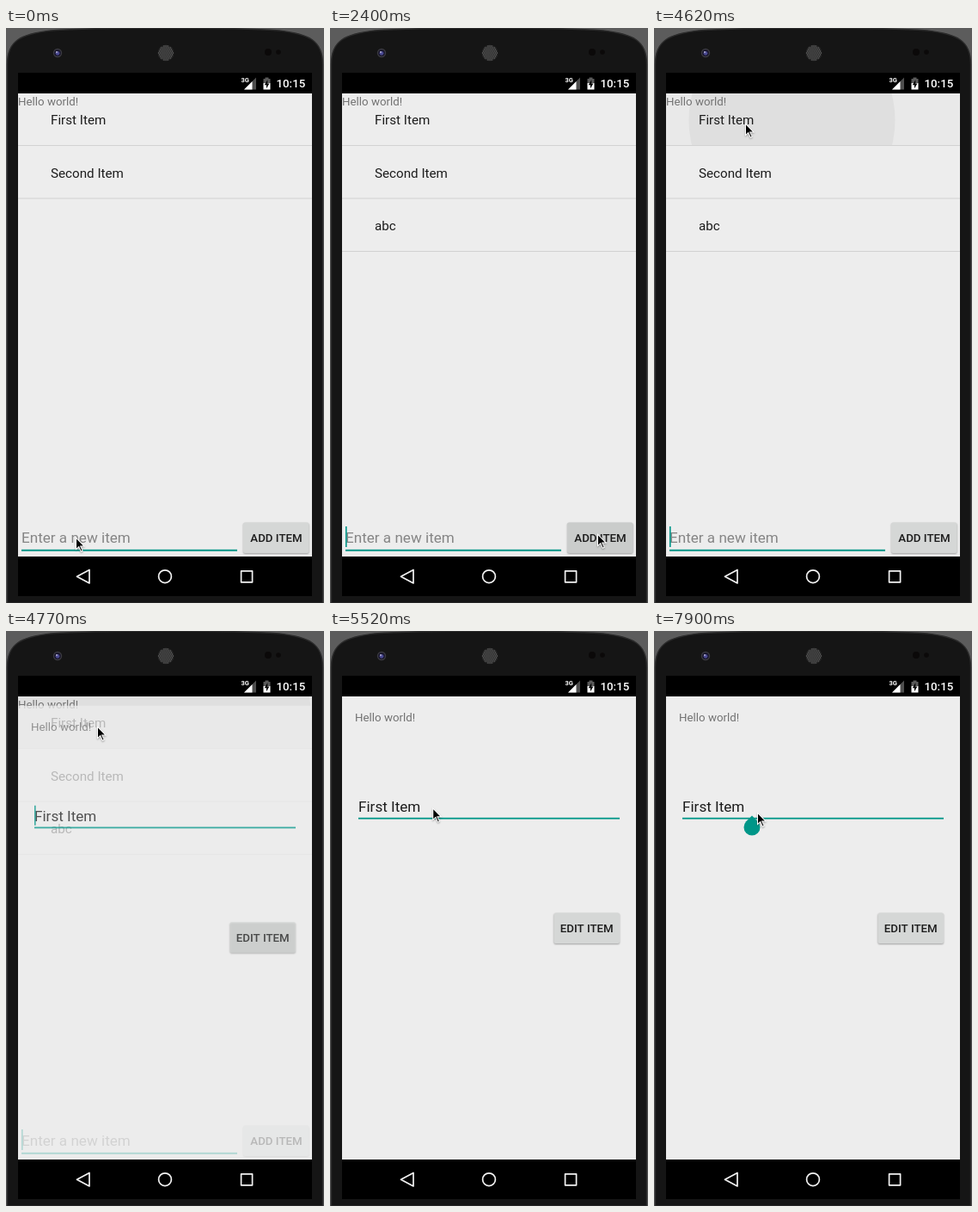
Write an HTML page with a canvas that moves like this. It is 370 px wide and 668 px high and loops after 8 s.

```html
<!DOCTYPE html>
<html lang="en">
<head>
<meta charset="utf-8">
<title>Item list</title>
<style>
html, body { margin: 0; width: 100%; height: 100%; overflow: hidden; background: #141414; }
canvas { display: block; width: 370px; height: 668px; }
</style>
</head>
<body>
<canvas id="stage"></canvas>
<script>
const W = 370, H = 668, LOOP = 8000;
const TEAL = '#009688', PAGE = '#ededed', INK = '#1c1c1c';
const SCREEN = { x: 14, y: 76, w: 342, h: 538 };

const TICKS = [0, 150, 600, 900, 1200, 1500, 1650, 1800, 1950, 2100, 2250, 2400,
  2690, 2840, 3140, 3290, 3430, 3580, 3730, 3880, 4330, 4620, 4770, 4920,
  5070, 5210, 5360, 5510, 5660, 6260, 6710, 7310, 7450, 7600, 7900];

// Pointer path: [time, x, y]
const POINTER = [[0, 81, 591], [1350, 81, 591], [1950, 311, 587], [2550, 311, 587],
  [2690, 325, 520], [2840, 228, 291], [3000, 228, 291], [3730, 106, 110],
  [4950, 106, 110], [5600, 120, 210]];

// Caret visibility windows
const LIST_CARET = [[150, 600], [900, 1800], [2250, 2840], [3290, 3880], [4330, 4920]];
const EDIT_CARET = [[4770, 5210], [5660, 6260], [6710, 7310], [7450, 7900]];

const canvas = document.getElementById('stage');
const ctx = canvas.getContext('2d');
const dpr = window.devicePixelRatio || 1;
canvas.width = W * dpr;
canvas.height = H * dpr;

const inAny = (spans, t) => spans.some(([a, b]) => t >= a && t < b);
const smooth = p => p * p * (3 - 2 * p);

function rect(x, y, w, h, color) {
  ctx.fillStyle = color;
  ctx.fillRect(x, y, w, h);
}

function disc(x, y, r, color) {
  ctx.fillStyle = color;
  ctx.beginPath();
  ctx.arc(x, y, r, 0, Math.PI * 2);
  ctx.fill();
}

function poly(points, color) {
  ctx.beginPath();
  points.forEach(([x, y]) => ctx.lineTo(x, y));
  ctx.closePath();
  if (color) {
    ctx.fillStyle = color;
    ctx.fill();
  }
}

function text(str, x, y, size, color = INK, weight = 400) {
  ctx.font = `${weight} ${size}px Roboto, sans-serif`;
  ctx.fillStyle = color;
  ctx.fillText(str, x, y);
}

function clipped(draw, x, y, w, h) {
  ctx.save();
  ctx.beginPath();
  ctx.rect(x, y, w, h);
  ctx.clip();
  draw();
  ctx.restore();
}

function drawPhone() {
  rect(0, 0, W, H, '#5c5c5c');
  ctx.beginPath();
  ctx.moveTo(1.5, H);
  ctx.lineTo(1.5, 42);
  ctx.bezierCurveTo(1.5, 14, 18, 7, 52, 3);
  ctx.quadraticCurveTo(90, 0, 185, 0);
  ctx.quadraticCurveTo(280, 0, 318, 3);
  ctx.bezierCurveTo(352, 7, 368.5, 14, 368.5, 42);
  ctx.lineTo(368.5, H);
  ctx.closePath();
  ctx.fillStyle = '#151515';
  ctx.fill();
  ctx.strokeStyle = '#2b2b2b';
  ctx.lineWidth = 1.5;
  ctx.stroke();

  disc(60, 29, 5.2, '#3b3a40');
  disc(60, 29, 3.8, '#16142a');
  disc(60, 29.3, 2.4, '#4b4a92');
  disc(59, 28, 1, '#b3b0d0');

  disc(186, 29, 9.5, '#262626');
  for (let row = -4; row <= 4; row++) {
    for (let col = -4; col <= 4; col++) {
      const x = col * 2.1 + (row & 1) * 1.05, y = row * 2;
      if (x * x + y * y < 78) disc(186 + x, 29 + y, 0.7, '#6a6a6a');
    }
  }
  disc(305, 28, 4, '#0b0909');
  disc(317, 28, 2.8, '#0b0909');
}

function drawStatusBar() {
  rect(14, 52, 342, 24, '#000');
  poly([[277, 71.5], [291, 57.5], [291, 71.5]], '#4d4d4d');
  poly([[277, 71.5], [286.5, 62], [286.5, 71.5]], '#fff');
  rect(272, 56, 11.5, 8, '#000');
  text('3G', 273.5, 63, 7.5, '#fff', 700);
  rect(301.5, 57.5, 4, 2, '#5a5a5a');
  rect(299.5, 59, 8, 5, '#5a5a5a');
  rect(299.5, 64, 8, 7.5, '#fff');
  poly([[304.3, 60], [300.8, 66.2], [303, 66.2], [303, 70.2], [306.4, 64.4], [304.3, 64.4]], '#000');
  text('10:15', 314.5, 69.4, 13.3, '#fff', 500);
}

function drawNavBar() {
  rect(14, 614, 342, 46, '#000');
  ctx.strokeStyle = '#f2f2f2';
  ctx.lineWidth = 1.7;
  ctx.lineJoin = 'round';
  poly([[82.5, 637.3], [97, 629.5], [97, 645]]);
  ctx.stroke();
  ctx.beginPath();
  ctx.arc(185, 637.2, 7.4, 0, Math.PI * 2);
  ctx.stroke();
  ctx.strokeRect(273.6, 630.8, 13, 13);
}

function drawButton(label, x, y, w, textX, color, lift = 1) {
  ctx.save();
  ctx.shadowColor = 'rgba(0,0,0,.32)';
  ctx.shadowBlur = 2 * lift * dpr;
  ctx.shadowOffsetY = lift * dpr;
  ctx.fillStyle = color;
  ctx.beginPath();
  ctx.roundRect(x, y, w, 35.5, 2);
  ctx.fill();
  ctx.restore();
  return () => text(label, textX, y + 22.8, 13.3, INK, 500);
}

function drawRow(label, top) {
  text(label, 52, top + 36, 15.2);
  rect(14, top + 60, 342, 1, '#d2d2d2');
}

function drawList(t) {
  const { x, y, w, h } = SCREEN;
  rect(x, y, w, h, PAGE);
  if (t >= 4620) {
    clipped(() => {
      rect(x, y, w, 60, '#e9e9e9');
      disc(160.5, 107, 120 + (t - 4620) * 0.5, '#dfdfdf');
    }, x, y, w, 60);
  }
  text('Hello world!', 14, 90, 13.3, '#737373');
  const rows = ['First Item', 'Second Item'];
  if (t >= 2250) rows.push('abc');
  rows.forEach((label, i) => drawRow(label, 76 + i * 61.5));

  const typed = t >= 2250 ? '' : 'abc'.slice(0, (t >= 150) + (t >= 900) + (t >= 1200));
  if (typed) text(typed, 18, 598.3, 17.1);
  else text('Enter a new item', 18, 598.3, 17.1, '#858585');
  rect(18, 605.8, 251, 2, TEAL);
  if (inAny(LIST_CARET, t)) {
    rect(18 + Math.round(ctx.measureText(typed).width), 579, 1.6, 24, TEAL);
  }

  const pressed = t >= 2100 && t < 2400;
  const fill = t >= 2100 && t < 2690 ? '#cacccb' : '#d5d7d6';
  const label = drawButton('ADD ITEM', 276, 574.5, 76.5, 284.3, fill, pressed ? 2 : 1);
  if (pressed) {
    clipped(() => disc(312, 590, 20 + (t - 2100) * 0.2, '#bfc1c0'), 276, 574.5, 76.5, 35.5);
  }
  label();
}

function drawHandle(x, y) {
  const r = 9.5, d = r * Math.SQRT1_2;
  disc(x, y, r, TEAL);
  poly([[x, y - r * Math.SQRT2], [x + d, y - d], [x, y], [x - d, y - d]], TEAL);
}

function drawEditor(t) {
  const { x, y, w, h } = SCREEN;
  rect(x, y, w, h, PAGE);
  text('Hello world!', 29, 105, 13.3, '#737373');
  text('First Item', 33, 210.2, 17.1);
  rect(33, 216.8, 304, 1.8, TEAL);
  if (inAny(EDIT_CARET, t)) rect(t >= 7450 ? 113.2 : 33, 192, 1.6, 23, TEAL);
  if (t >= 7600) drawHandle(114, 228);
  drawButton('EDIT ITEM', 260.5, 327.5, 76.5, 267.8, '#d5d7d6')();
}

function drawPointer(t) {
  let i = POINTER.length - 1;
  while (t < POINTER[i][0]) i--;
  const a = POINTER[i], b = POINTER[i + 1] || a;
  const p = b === a ? 0 : smooth((t - a[0]) / (b[0] - a[0]));
  ctx.save();
  ctx.translate(a[1] + (b[1] - a[1]) * p, a[2] + (b[2] - a[2]) * p);
  poly([[0, 0], [0, 15.8], [3.6, 12.4], [6, 18], [8.8, 16.8], [6.4, 11.4], [11.2, 11.4]]);
  ctx.shadowColor = 'rgba(0,0,0,.35)';
  ctx.shadowBlur = 2 * dpr;
  ctx.shadowOffsetY = dpr;
  ctx.fillStyle = '#fff';
  ctx.fill();
  ctx.restore();
  ctx.save();
  ctx.translate(a[1] + (b[1] - a[1]) * p, a[2] + (b[2] - a[2]) * p);
  poly([[1, 2.4], [1, 13.4], [3.9, 10.7], [6.5, 16.6], [7.5, 16.1], [4.9, 10.4], [8.8, 10.4]], '#000');
  ctx.restore();
}

function render(t) {
  ctx.setTransform(dpr, 0, 0, dpr, 0, 0);
  drawPhone();
  drawStatusBar();
  clipped(() => {
    const open = Math.min(1, Math.max(0, (t - 4620) / 300));
    if (open < 1) drawList(t);
    if (open > 0) {
      ctx.globalAlpha = Math.min(1, open * 1.5);
      ctx.translate(0, 43 * (1 - open) ** 2);
      drawEditor(t);
    }
  }, SCREEN.x, SCREEN.y, SCREEN.w, SCREEN.h);
  drawNavBar();
  drawPointer(t);
}

function frame() {
  const now = performance.now() % LOOP;
  render(TICKS.findLast(tick => tick <= now));
  requestAnimationFrame(frame);
}
frame();
</script>
</body>
</html>
```
